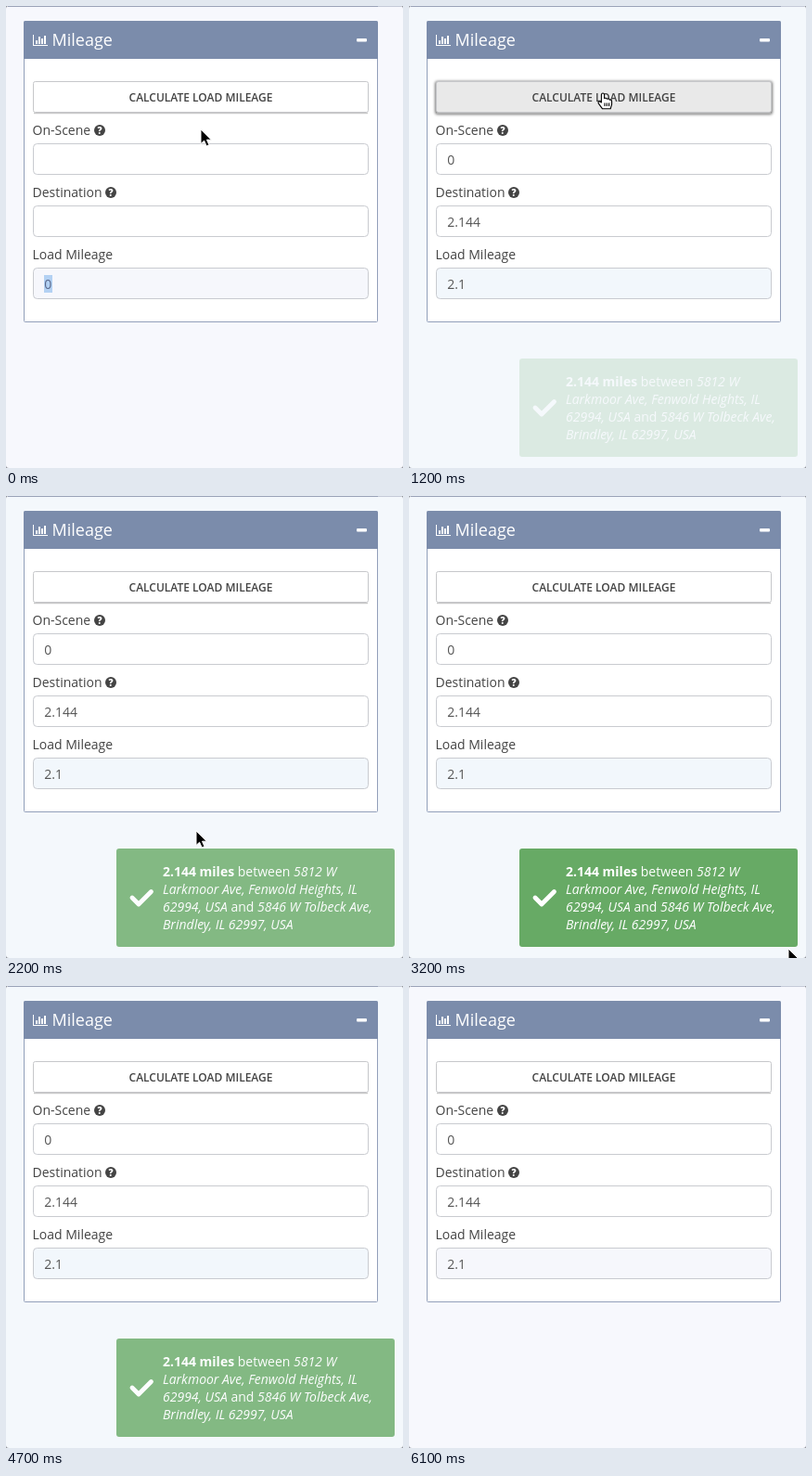
Write an HTML page that moves like this. It is 428 by 498 pixels and loops after 6200 ms.

```html
<!DOCTYPE html>
<html lang="en">
<head>
<meta charset="utf-8">
<title>Mileage</title>
<style>
html, body { margin: 0; width: 100%; height: 100%; overflow: hidden; background: #85888f; }
svg { display: block; font: 14px "Open Sans", sans-serif; fill: #444; }
.field { fill: #fff; stroke: #c9cbd0; }
.value { fill: #555; }
.help text { font-size: 10px; font-weight: 800; fill: #fff; text-anchor: middle; }
.white { fill: #fff; }
</style>
</head>
<body>
<svg width="428" height="498" viewBox="0 0 428 498">
  <rect id="page" width="428" height="498" rx="3"/>
  <path d="M2 .5H401" stroke="#9ba3b8"/>
  <path d="M401 .5H426" stroke="#c5cad8"/>

  <rect x="19.5" y="16.5" width="381" height="324" rx="1" fill="#fff" stroke="#929fba"/>
  <path d="M19 57V18q0-2 2-2H399q2 0 2 2V57Z" fill="#7b8cab"/>
  <g class="white">
    <path d="M29 31h1v11h15v1H29ZM32 37h2v4h-2ZM35 33h2v8h-2ZM38 35h2v6h-2ZM41 32h2v9h-2Z"/>
    <text x="49.5" y="43" font-size="18">Mileage</text>
    <rect x="378" y="35" width="11" height="3.4" rx="1"/>
  </g>

  <rect id="shade" x="28" y="81" width="364" height="36" rx="3" fill="#777" style="filter: blur(1.5px)"/>
  <path d="M30 115.7H390" stroke="#bbb"/>
  <rect id="button" x="29.5" y="81.5" width="361" height="33" rx="2" stroke="#c6c7ca"/>
  <text x="210" y="103" font-size="12" font-weight="600" text-anchor="middle">CALCULATE LOAD MILEAGE</text>

  <text x="28.5" y="139">On-Scene</text>
  <text x="28.5" y="206">Destination</text>
  <text x="28.5" y="273">Load Mileage</text>
  <g class="help">
    <circle cx="101" cy="134" r="6"/><text x="101" y="137.7">?</text>
    <circle cx="113" cy="201" r="6"/><text x="113" y="204.7">?</text>
  </g>

  <rect class="field" x="29.5" y="148.5" width="361" height="33" rx="4"/>
  <rect class="field" x="29.5" y="215.5" width="361" height="33" rx="4"/>
  <rect class="field" id="total" x="29.5" y="282.5" width="361" height="33" rx="4"/>
  <g id="before">
    <rect x="41" y="290" width="9" height="19" fill="#b3d1f3"/>
    <text x="41.3" y="305" fill="#59688c">0</text>
  </g>
  <g id="after" class="value">
    <text x="41.3" y="171">0</text>
    <text x="41.3" y="238">2.144</text>
    <text x="41.3" y="305">2.1</text>
  </g>

  <g id="toast" class="white">
    <rect x="119" y="380" width="300" height="106" rx="3" fill="#67aa65"/>
    <path d="M136 433l7 7 13.5-13.5" fill="none" stroke="#fff" stroke-width="4.8" stroke-linejoin="round" stroke-linecap="round"/>
    <text x="169" y="410"><tspan font-weight="700">2.144 miles</tspan> between <tspan font-style="italic">5812 W</tspan></text>
    <text x="169" y="429" font-style="italic">Larkmoor Ave, Fenwold Heights, IL</text>
    <text x="169" y="448"><tspan font-style="italic">62994, USA</tspan> and <tspan font-style="italic">5846 W Tolbeck Ave,</tspan></text>
    <text x="169" y="467" font-style="italic">Brindley, IL 62997, USA</text>
  </g>

  <path id="arrow" d="M0 0V15.5L3.6 12.2 6.2 18 9 16.8 6.5 11.2H11.4Z" fill="#000" stroke="#fff"/>
  <g id="hand" stroke="#000" stroke-width="1.1" stroke-linejoin="round">
    <path class="white" d="M-1.6 10V1.5Q-1.4 0 0 0T1.6 1.5V5.6Q3.6 4.6 4.6 6.3 6.6 5.4 7.4 7.2 9.6 6.6 9.6 9V12L8.2 16.8H-.4L-4.8 10.8Q-5.4 8.8-3.6 8.8Z"/>
    <path d="M2 10.5v3.6M4.3 10.5v3.6M6.6 10.5v3.6"/>
  </g>
</svg>
<script>
const LOOP = 6200, CLICK = 1110, FADE_IN = 300;
const ENTER = 2880, LEAVE = 4130, FADE_OUT = 5050, GONE = 6090;
// time, x, y of the pointer tip
const path = [
  [0, 210, 133], [100, 210, 133], [650, 209, 94], [1500, 209, 94], [2150, 205, 361],
  [2250, 205, 361], [2800, 400, 368], [3200, 409, 488], [3500, 310, 476],
  [4000, 128, 481], [4200, 122, 504], [LOOP, 122, 504]
];
const el = id => document.getElementById(id);
const show = (id, on) => el(id).setAttribute('visibility', on ? 'visible' : 'hidden');
const clamp = v => Math.min(1, Math.max(0, v));
const swing = v => .5 - Math.cos(clamp(v) * Math.PI) / 2;

function pointerAt(t) {
  const i = path.findIndex(p => p[0] > t);
  const [t0, x0, y0] = path[i - 1], [t1, x1, y1] = path[i];
  const k = swing((t - t0) / (t1 - t0));
  return [x0 + (x1 - x0) * k, y0 + (y1 - y0) * k];
}

function toastOpacity(t) {
  if (t >= ENTER && t < LEAVE) return 1;
  return .8 * swing((t - CLICK) / FADE_IN) * (1 - swing((t - FADE_OUT) / (GONE - FADE_OUT)));
}

function draw(t) {
  const [x, y] = pointerAt(t);
  const onButton = y > 81 && y < 116;
  const onToast = x > 119 && y > 380 && y < 486;
  const clicked = t >= CLICK, active = clicked && t < GONE;

  el('page').setAttribute('fill', active ? '#f4f8fc' : '#f7f8fd');
  el('total').style.fill = active ? '#f2f7fc' : '#f6f7fc';
  el('button').setAttribute('fill', onButton ? '#e9e9e9' : '#fff');
  show('shade', onButton);
  show('before', !clicked);
  show('after', clicked);
  el('toast').setAttribute('opacity', toastOpacity(t));

  const overTarget = onButton || onToast;
  show('arrow', !overTarget);
  show('hand', overTarget);
  for (const id of ['arrow', 'hand']) el(id).setAttribute('transform', `translate(${x} ${y})`);
}

function tick() {
  draw(performance.now() % LOOP);
  requestAnimationFrame(tick);
}
tick();
</script>
</body>
</html>
```
